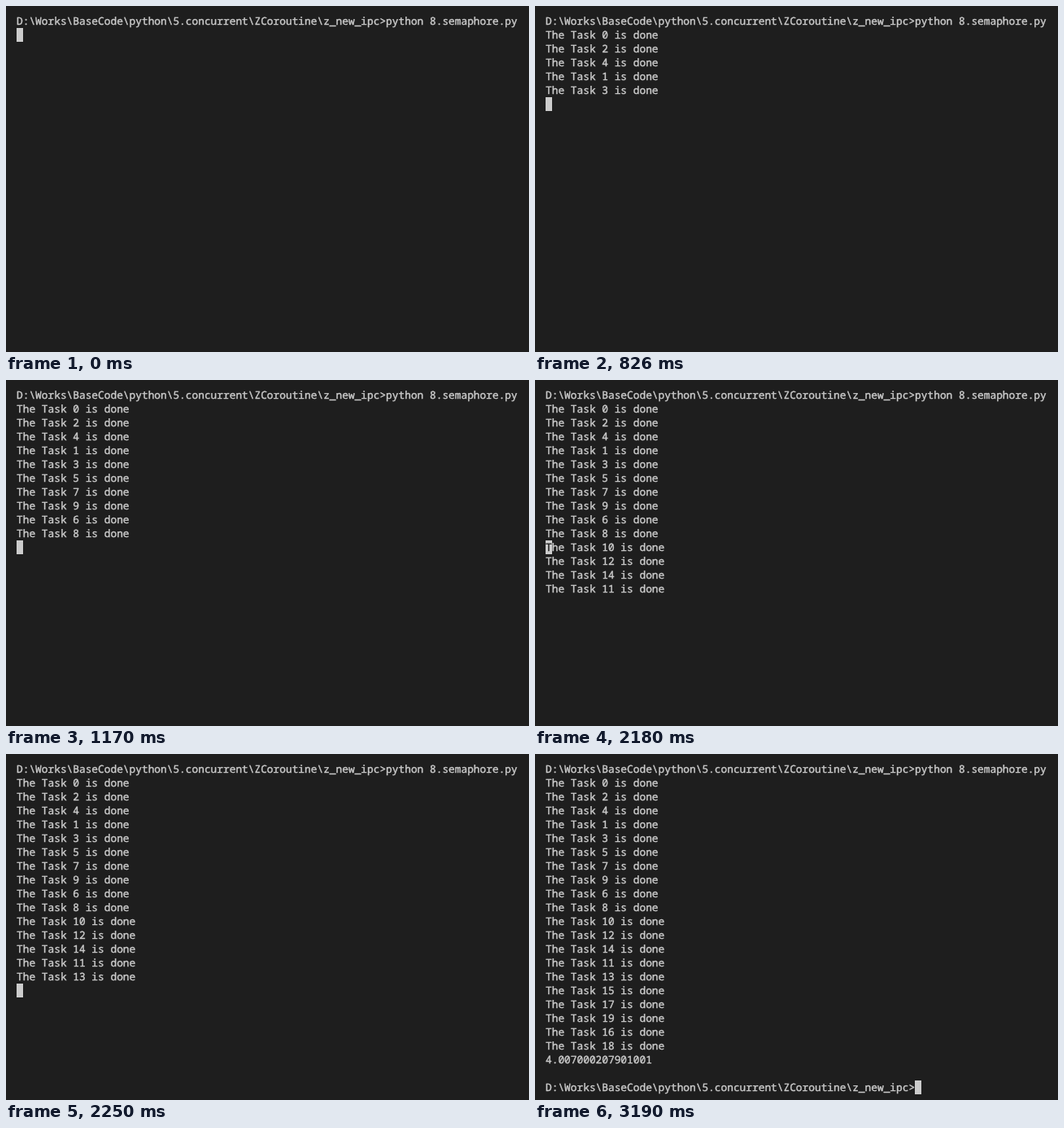
Write an HTML page that moves like this. It is 643 px wide and 425 px high and loops after 3740 ms.

```html
<!DOCTYPE html>
<html>
<head>
<meta charset="utf-8">
<style>
html, body { margin: 0; width: 100%; height: 100%; overflow: hidden; background: #1e1e1e; }
svg { display: block; color: #ccc; }
text {
  font: 12.833px "Noto Sans Mono", monospace;
  fill: currentColor;
  stroke: currentColor;
  stroke-width: 0.4px;
  text-rendering: geometricPrecision;
  white-space: pre;
}
</style>
</head>
<body>
<svg id="term" width="643" height="425"></svg>
<script>
const LEFT = 13, TOP = 10, ROW = 17, BASE = 13, CELL = 7.7, LOOP = 3740;
const prompt = 'D:\\Works\\BaseCode\\python\\5.concurrent\\ZCoroutine\\z_new_ipc>';

// Tasks run in batches of five that finish in this order.
const order = [0, 2, 4, 1, 3];
const lines = [prompt + 'python 8.semaphore.py'];
for (let i = 0; i < 20; i++) {
  lines.push(`The Task ${i - i % 5 + order[i % 5]} is done`);
}
lines.push('4.007000207901001', '', prompt);

// Start time, visible lines, cursor row and cursor column
const steps = [
  [0, 1, 1, 0],
  [310, 6, 6, 0],
  [1170, 11, 11, 0],
  [2180, 15, 11, 0],
  [2250, 16, 16, 0],
  [3190, 24, 23, prompt.length],
];

const term = document.getElementById('term');

function add(tag, attrs, content = '') {
  const el = document.createElementNS('http://www.w3.org/2000/svg', tag);
  for (const key in attrs) el.setAttribute(key, attrs[key]);
  el.textContent = content;
  return term.appendChild(el);
}

const rows = lines.map((line, i) => add('text', { x: LEFT, y: TOP + i * ROW + BASE }, line));
const cursor = add('rect', { width: 8, height: ROW, fill: 'currentColor' });
const covered = add('text', { color: '#1e1e1e' });

function draw(now) {
  const t = now % LOOP;
  const [, count, row, col] = steps.findLast(step => step[0] <= t);
  rows.forEach((el, i) => el.style.display = i < count ? '' : 'none');
  const x = Math.floor(LEFT + col * CELL), y = TOP + row * ROW;
  cursor.setAttribute('x', x);
  cursor.setAttribute('y', y);
  covered.setAttribute('x', x);
  covered.setAttribute('y', y + BASE);
  covered.textContent = row < count ? lines[row].charAt(col) : '';
}

function tick() {
  draw(performance.now());
  requestAnimationFrame(tick);
}
tick();
</script>
</body>
</html>
```
